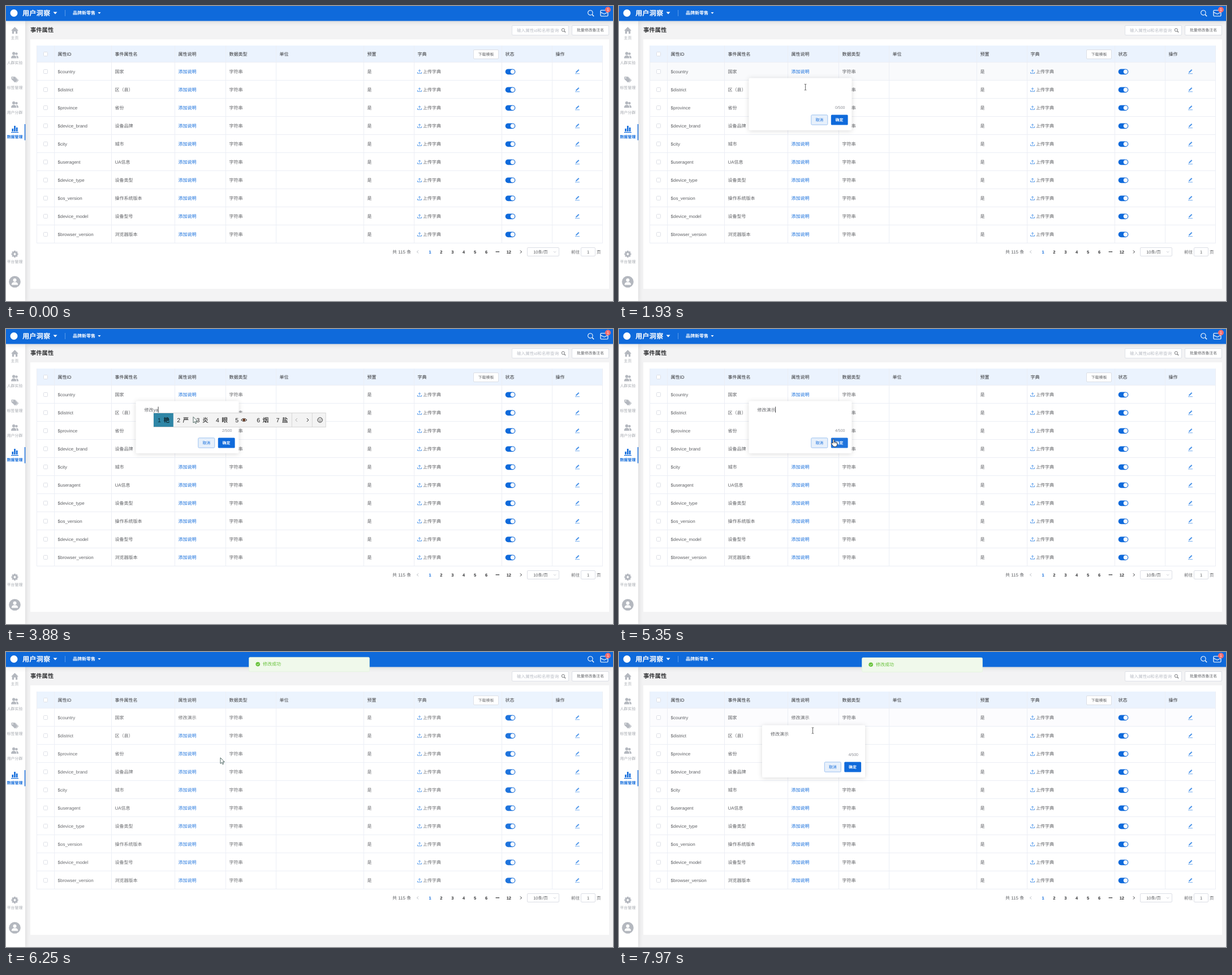
These frames come from a looping animation (1073x522 px, 8 s). An HTML page:

```html
<!DOCTYPE html>
<html>
<head>
<meta charset="utf-8">
<title>事件属性</title>
<style>
  html, body { margin: 0; width: 100%; height: 100%; overflow: hidden; background: #f3f3f4; }
  svg {
    display: block; text-rendering: geometricPrecision;
    font-family: "Liberation Sans", "Noto Sans CJK SC", "Noto Sans CJK", sans-serif;
  }
  .shadow { filter: drop-shadow(0 1px 4px rgba(0, 0, 0, .14)); }
</style>
</head>
<body>
<svg id="stage" width="1073" height="522" viewBox="0 0 1073 522"></svg>
<script>
const LOOP = 8000;
const BLUE = '#0f6adb', INK = '#606266', DARK = '#303133', LINE = '#ebeef5', GRAY = '#b4b8bf';
const ROW_TOP = 100, ROW_H = 32;
const COLUMNS = [85.5, 186.5, 298.5, 388.5, 477.5, 632.5, 721.5, 876.5, 965.5];
const HEADINGS = ['属性ID', '事件属性名', '属性说明', '数据类型', '单位', '预置', '字典', '状态', '操作'];
const ROWS = [
  ['$country', '国家'], ['$district', '区（县）'], ['$province', '省份'], ['$device_brand', '设备品牌'],
  ['$city', '城市'], ['$useragent', 'UA信息'], ['$device_type', '设备类型'], ['$os_version', '操作系统版本'],
  ['$device_model', '设备型号'], ['$browser_version', '浏览器版本'],
];

// Drawing helpers; text is placed by its vertical centre.
const text = (x, y, s, size = 8, fill = INK, attrs = '') =>
  `<text x="${x}" y="${y + size * .35}" font-size="${size}" fill="${fill}" ${attrs}>${s}</text>`;
const rect = (x, y, w, h, fill, attrs = '') =>
  `<rect x="${x}" y="${y}" width="${w}" height="${h}" fill="${fill}" ${attrs}/>`;
const circle = (x, y, r, fill, attrs = '') => `<circle cx="${x}" cy="${y}" r="${r}" fill="${fill}" ${attrs}/>`;
const fillPath = (d, fill) => `<path d="${d}" fill="${fill}"/>`;
const stroke = (d, color, width = 1) => `<path d="${d}" fill="none" stroke="${color}" stroke-width="${width}"/>`;
const at = (x, y, body) => `<g transform="translate(${x} ${y})">${body}</g>`;
const MID = 'text-anchor="middle"', BOLD = 'font-weight="bold"', MEDIUM = 'font-weight="500"';
const outline = color => `stroke="${color}" rx="1.5"`;

const magnifier = (x, y, r, color, w) =>
  at(x, y, circle(-.6, -.6, r, 'none', `stroke="${color}" stroke-width="${w}"`) +
    stroke(`M${r * .6} ${r * .6}L${r * 1.35} ${r * 1.35}`, color, w * 1.3));

function header() {
  return rect(0, 0, 1073, 26.5, BLUE, 'class="shadow"') +
    circle(14, 12.5, 6.5, '#fff') +
    text(29, 12.5, '用户洞察', 12.3, '#fff', 'font-weight="900"') +
    fillPath('M83.5 10.5h7l-3.5 4z', '#fff') +
    stroke('M104.5 7V18', '#5b9ae8') +
    text(118, 12.5, '品牌新零售', 8, '#fff', BOLD) +
    fillPath('M162.5 11h5l-2.5 3z', '#fff') +
    magnifier(1033.5, 12.5, 4.2, '#fff', 1.1) +
    rect(1051, 7.5, 13, 10.5, 'none', 'stroke="#fff" stroke-width="1.2" rx="1.5"') +
    stroke('M1051 11l6.5 3.2 6.5-3.2', '#fff', 1.2) +
    circle(1064, 6.5, 5, '#f56c6c') + text(1064, 6.5, '1', 7, '#fff', MID);
}

function sidebar() {
  const people = circle(-1.8, -3, 2.7, GRAY) + circle(3, -2.6, 2.2, GRAY) +
    fillPath('M-6.5 5.5q0-5 4.7-5t4.7 5zM3.8 5.5q0-3-1.4-4.6 4.1-.6 4.1 4.6z', GRAY);
  const teeth = [0, 45, 90, 135].map(a => rect(-1.5, -6, 3, 12, GRAY, `transform="rotate(${a})"`)).join('');
  const icons = [
    [43, '主页', fillPath('M-6.5 .5L0-6 6.5.5H4.7V6H1.5V2h-3v4h-3.2V.5z', GRAY)],
    [87, '人群实验', people],
    [130.5, '标签管理', fillPath('M-6-5.5h5L5 .5 .5 5-6-1zM.5-5.5L6.8.7 3 5l-.8-.7L5.6.6-.8-5.5z', GRAY) + circle(-3.6, -3.2, 1, '#fff')],
    [174.5, '用户分群', people],
    [218, '数据管理', fillPath('M-5-1h2.6v5H-5zM-1.3-6h2.6V4h-2.6zM2.4-3H5v7H2.4zM-6.5 5h13v1.2h-13z', BLUE)],
    [439, '平台管理', teeth + circle(0, 0, 4.6, GRAY) + circle(0, 0, 1.9, '#fff')],
  ];
  return rect(0, 26, 34, 496, '#fff', 'class="shadow"') +
    icons.map(([y, label, icon]) => {
      const active = label === '数据管理';
      return at(15.5, y, icon) +
        text(15.5, y + 14, label, 6.9, active ? BLUE : '#a4a8ae', MID + (active ? ' ' + BOLD : ''));
    }).join('') +
    rect(32.8, 209, 1.4, 28.5, BLUE) +
    circle(15.5, 488, 10.3, GRAY) + circle(15.5, 485, 3, '#fff') +
    fillPath('M9.8 493.5q0-5 5.7-5t5.7 5z', '#fff');
}

function toolbar() {
  return text(43, 42.5, '事件属性', 10.3, DARK, BOLD) +
    rect(894.5, 34.5, 100, 17, '#fff', outline('#dfe2e8')) +
    text(903, 43, '输入属性id和名称查询', 7.6, '#b9bdc5') +
    magnifier(985.5, 43, 2.6, INK, .9) +
    rect(1000.5, 34.5, 65, 17, '#fff', outline('#dcdfe6')) +
    text(1033, 43, '批量修改备注名', 6.9, INK, MID + ' ' + MEDIUM);
}

const checkbox = y => rect(66.5, y - 3.5, 7, 7, '#fff', 'stroke="#dcdfe6" rx="1"');

function tableRow([id, name], i) {
  const y = ROW_TOP + ROW_H * i + 16;
  return checkbox(y) + text(91.5, y, id) + text(192.5, y + .3, name) +
    text(304.5, y, '添加说明', 8, BLUE, `id="note${i}"`) +
    text(394.5, y, '字符串') + text(638.5, y, '是') +
    at(731, y, stroke('M-3.5 1V3.2H3.5V1M0 1.5V-3M-2-1.2L0-3.2 2-1.2', '#3f8ee8', .9)) +
    text(737, y, '上传字典') +
    rect(882.7, y - 4.6, 17.6, 9.8, BLUE, 'rx="4.9"') + circle(895.5, y + .3, 3.7, '#fff') +
    at(1010, y, fillPath('M-3 2.2L-2.4.2 2-4 3.4-2.6-1 1.7z', '#4b94e9') + stroke('M-4 3.7H4', '#4b94e9', .8));
}

function table() {
  return rect(43, 59, 1023, 441.5, '#fff') + rect(54.5, 70, 1000, 30, '#ebf3fe') +
    ROWS.map((_, i) => rect(55, ROW_TOP + ROW_H * i, 999, ROW_H, '#f4f6fa', `id="hover${i}" opacity="0"`)).join('') +
    stroke('M54.5 70V420M1054.5 70V420' + COLUMNS.map(x => `M${x} 70V420`).join(''), LINE) +
    stroke(ROWS.map((_, i) => `M54.5 ${ROW_TOP + ROW_H * (i + 1) - .5}H1054.5`).join('') + 'M54.5 99.5H1054.5', LINE) +
    checkbox(85) + HEADINGS.map((h, i) => text(COLUMNS[i] + 6, 85, h, 8, DARK)).join('') +
    rect(826.5, 77.5, 44, 16, '#fff', outline('#dcdfe6')) + text(848.5, 85.5, '下载模板', 6.9, INK, MID + ' ' + MEDIUM) +
    ROWS.map(tableRow).join('');
}

function pagination() {
  const pages = ['1', '2', '3', '4', '5', '6', '•••', '12'];
  return text(683, 435, '共 115 条') +
    stroke('M729 432.5l-2.5 2.5 2.5 2.5', GRAY) + stroke('M909 432.5l2.5 2.5-2.5 2.5', DARK) +
    pages.map((p, i) => text(749.5 + 19.9 * i, 435, p, p === '•••' ? 6.5 : 7.5, i ? DARK : BLUE, MID + ' ' + BOLD)).join('') +
    rect(921.5, 427.5, 56, 15, '#fff', outline('#dcdfe6')) + text(945, 435, '10条/页', 7.6, INK, MID) +
    stroke('M968 434l2.2 2.2 2.2-2.2', '#c0c4cc', .8) +
    text(999, 435, '前往', 7.6) + rect(1016.5, 427.5, 25, 15, '#fff', outline('#dcdfe6')) +
    text(1029, 435, '1', 7.6, INK, MID) + text(1044, 435, '页', 7.6);
}

function popover() {
  return rect(229.5, 127.5, 182, 92.5, '#fff', 'rx="2" class="shadow"') +
    text(244.5, 143, '', 8, INK, 'id="entry"') +
    rect(0, 137.5, .9, 10.5, DARK, 'id="caret"') +
    text(399.5, 179.5, '', 7, '#8b8e95', 'id="count" text-anchor="end"') +
    rect(339.8, 192.8, 29, 17.4, '#e7f0fb', outline('#9fc3f1')) + text(354.3, 201.6, '取消', 6.9, BLUE, MID) +
    rect(374.8, 192.6, 29.8, 17.8, BLUE, 'id="confirm" rx="1.5"') + text(389.5, 201.6, '确定', 6.9, '#fff', MID + ' ' + BOLD);
}

function toast() {
  return rect(429.5, 10, 213, 25.5, '#f0f9eb', 'stroke="#e1f3d8" stroke-width=".6" rx="2"') +
    circle(445.2, 22.3, 3.8, '#67c23a') + stroke('M443.4 22.3l1.4 1.4 2.4-2.6', '#fff', .9) +
    text(454, 22.3, '修改成功', 8, '#67c23a');
}

const CURSORS = {
  arrow: '<path d="M0 0V10.5L2.4 8.3 4 11.8 5.7 11 4.1 7.6H7.3z" fill="#fff" stroke="#26443f" stroke-width=".8"/>',
  hand: '<path d="M-.9 7V1Q-.9 0 .2 0T1.3 1V5Q3 4.4 3.3 5.4 5 4.9 5.2 6 6.6 5.8 6.6 7V9.5Q6.6 13.2 3.6 13.2H1.6Q0 13.2-1 11.5L-3.6 8Q-3.8 6.6-2.5 6.7z" fill="#fff" stroke="#222" stroke-width=".8"/>' +
    stroke('M1.3 5V7.5M3.3 5.6V7.6M5.2 6.2V7.8', '#222', .6),
  ibeam: stroke('M.2-1.2H1.6L2-.8 2.4-1.2H3.8M2-.8V8.8M.2 9.2H1.6L2 8.8 2.4 9.2H3.8', '#333', .75),
};

// Edits of the text area: time, committed text, pinyin, candidates.
const XI = '系 西 洗 细 喜 吸 戏', XIU = '修 休 秀 袖 羞 朽 绣', FIX = '修改 秀改 修该 休改 修盖 秀该 绣盖';
const YAN = '艳 严 炎 眼 👁 烟 盐', SHOW = '演示 掩饰 岩石 严实 延时 厌世 验视';
const EDITS = [
  [0, '', ''], [2060, '', ''],
  [3050, '', 'x', '下 先 想 小 向 行 像'], [3130, '', 'xi', XI], [3200, '', 'xiu', XIU],
  [3290, '', "xiu'g", FIX], [3350, '', "xiu'ga", FIX], [3410, '', "xiu'gai", FIX],
  [3490, '修改', ''],
  [3720, '修改', 'y', '一 有 也 要 与 又 因'], [3840, '修改', 'ya', YAN], [3910, '修改', 'yan', YAN],
  [3990, '修改', "yan's", SHOW], [4060, '修改', "yan'sh", SHOW], [4130, '修改', "yan'shi", SHOW],
  [4250, '修改演示', ''],
];

const eye = x => at(x, 161, fillPath('M-5.5 0Q0-6.5 5.5 0 0 6.5-5.5 0z', '#222') +
  fillPath('M-4.2 0Q0-4.8 4.2 0 0 4.8-4.2 0z', '#fff') + circle(0, 0, 2.4, '#8a4b2a') + circle(0, 0, 1.1, '#111'));

function candidateBar(left, list) {
  if (!list) return '';
  const words = list.split(' '), wide = words[0].length > 1;
  const width = wide ? 375 : 304;
  let x = left, items = '';
  words.forEach((word, i) => {
    const isEye = word === '👁', w = wide ? 44.4 : isEye ? 38 : 34.3;
    if (!i) items += rect(x, 149, w + .5, 24, '#2f86a6');
    items += text(x + 7, 161, i + 1, 10.5, i ? '#222' : '#0b2a36') +
      (isEye ? eye(x + 17.3 + 5.2) : text(x + 17.3, 161, word, 10.8, '#000'));
    x += w;
  });
  return rect(left + .2, 148.5, width, 25, '#f3f3f3', 'stroke="#d6d6d6"') + items +
    stroke(`M${x + .5} 149V173M${x + 36.5} 149V173`, '#d6d6d6') +
    stroke(`M${x + 10} 158l-3 3 3 3`, '#aaa') + stroke(`M${x + 27} 158l3 3-3 3`, '#222') +
    at(x + 50.3, 161, circle(0, 0, 4.3, 'none', 'stroke="#222" stroke-width=".9"') +
      circle(-1.6, -1.2, .7, '#222') + circle(1.6, -1.2, .7, '#222') + stroke('M-2.2 1.2Q0 3.4 2.2 1.2', '#222', .8));
}

const stage = document.getElementById('stage');
stage.innerHTML = rect(0, 0, 1073, 522, '#f3f3f4') + toolbar() + table() + pagination() +
  rect(54.5, 70, 1000, 350, '#fff', 'id="mask"') + sidebar() + header() +
  `<g id="toast">${toast()}</g><g id="popover">${popover()}</g><g id="bar"></g><g id="cursor"></g>`;
const el = {};
stage.querySelectorAll('[id]').forEach(node => el[node.id] = node);

const ramp = (t, a, b) => Math.min(1, Math.max(0, (t - a) / (b - a)));
const smooth = p => p * p * (3 - 2 * p);
const latest = (list, t) => list.findLast(item => item[0] <= t);
const set = (node, attrs) => { for (const key in attrs) node.setAttribute(key, attrs[key]); };

const POINTER = [
  [280, 410, 526], [840, 328, 122], [1060, 322.5, 117], [1680, 322.5, 117], [2130, 331, 155.5], [4820, 331, 155.5],
  [5350, 379, 195], [5960, 379, 195], [6250, 379, 187], [6750, 362, 148], [7100, 342, 108.5], [7610, 342, 108.5],
  [7970, 340.5, 135],
];
const SHAPES = [
  [280, 'arrow'], [900, 'hand'], [1780, 'arrow'], [1860, 'ibeam'], [3490, 'arrow'], [4250, 'ibeam'],
  [5020, 'arrow'], [5240, 'hand'], [5640, 'arrow'], [7040, 'hand'], [7880, 'ibeam'],
];

function pointerAt(t) {
  const i = POINTER.findLastIndex(p => p[0] <= t);
  if (i < 0) return null;
  const a = POINTER[i], b = POINTER[i + 1] || a;
  const p = a === b ? 0 : smooth(ramp(t, a[0], b[0]));
  return { x: a[1] + (b[1] - a[1]) * p, y: a[2] + (b[2] - a[2]) * p };
}

function hoveredRow(t) {
  const p = pointerAt(t);
  if (!p || (t > 5900 && t < 6400)) return -1;
  const shift = t > 7000 ? 23.5 : 0;
  const open = (t > 1220 && t < 5600) || t > 7610;
  if (open && p.y > 128 && p.y < 220 && p.x > 229 + shift && p.x < 412 + shift) return -1;
  return Math.floor((p.y - ROW_TOP) / ROW_H);
}

// Averaging the recent past gives the 200 ms fade of the row highlight.
function drawHover(t) {
  const levels = ROWS.map(() => 0);
  for (let k = 0; k < 10; k++) {
    const row = hoveredRow(t - k * 20);
    if (row in levels) levels[row] += .1;
  }
  levels.forEach((level, i) => set(el['hover' + i], { opacity: level }));
}

let shownEdit;
function drawEditor(t) {
  const second = t > 7000;
  const opacity = second ? ramp(t, 7580, 7850) : Math.min(ramp(t, 1200, 1450), 1 - ramp(t, 5580, 5760));
  set(el.popover, { opacity, transform: second ? 'translate(23.5 2)' : '' });
  set(el.confirm, { fill: t > 5240 && t < 5800 ? '#1f74dd' : BLUE });
  const edit = latest(EDITS, t), [since, done, pinyin, list] = edit;
  if (edit !== shownEdit) {
    shownEdit = edit;
    el.entry.textContent = done + pinyin;
    el.count.textContent = done.length + '/500';
    el.bar.innerHTML = candidateBar(245 + done.length * 8, list);
    set(el.caret, { x: 244.2 + (done + pinyin ? el.entry.getComputedTextLength() : 0) });
  }
  const lit = t >= 2060 && t < 5570 && Math.floor((t - since) / 530) % 2 === 0;
  set(el.caret, { opacity: lit ? 1 : 0 });
}

function draw(t) {
  drawHover(t);
  drawEditor(t);
  const saved = t >= 5640;
  el.note0.textContent = saved ? '修改演示' : '添加说明';
  set(el.note0, { fill: saved ? INK : BLUE });
  set(el.mask, { opacity: .35 * Math.min(ramp(t, 5940, 6060), 1 - ramp(t, 6090, 6290)) });
  const rise = 1 - ramp(t, 5940, 6340);
  set(el.toast, { opacity: ramp(t, 5940, 6240), transform: `translate(0 ${-26 * rise ** 2.4})` });
  const p = pointerAt(t);
  el.cursor.innerHTML = p ? CURSORS[latest(SHAPES, t)[1]] : '';
  if (p) set(el.cursor, { transform: `translate(${p.x} ${p.y})` });
}

const start = performance.now();
function tick() {
  draw((performance.now() - start) % LOOP);
  requestAnimationFrame(tick);
}
tick();
</script>
</body>
</html>
```
